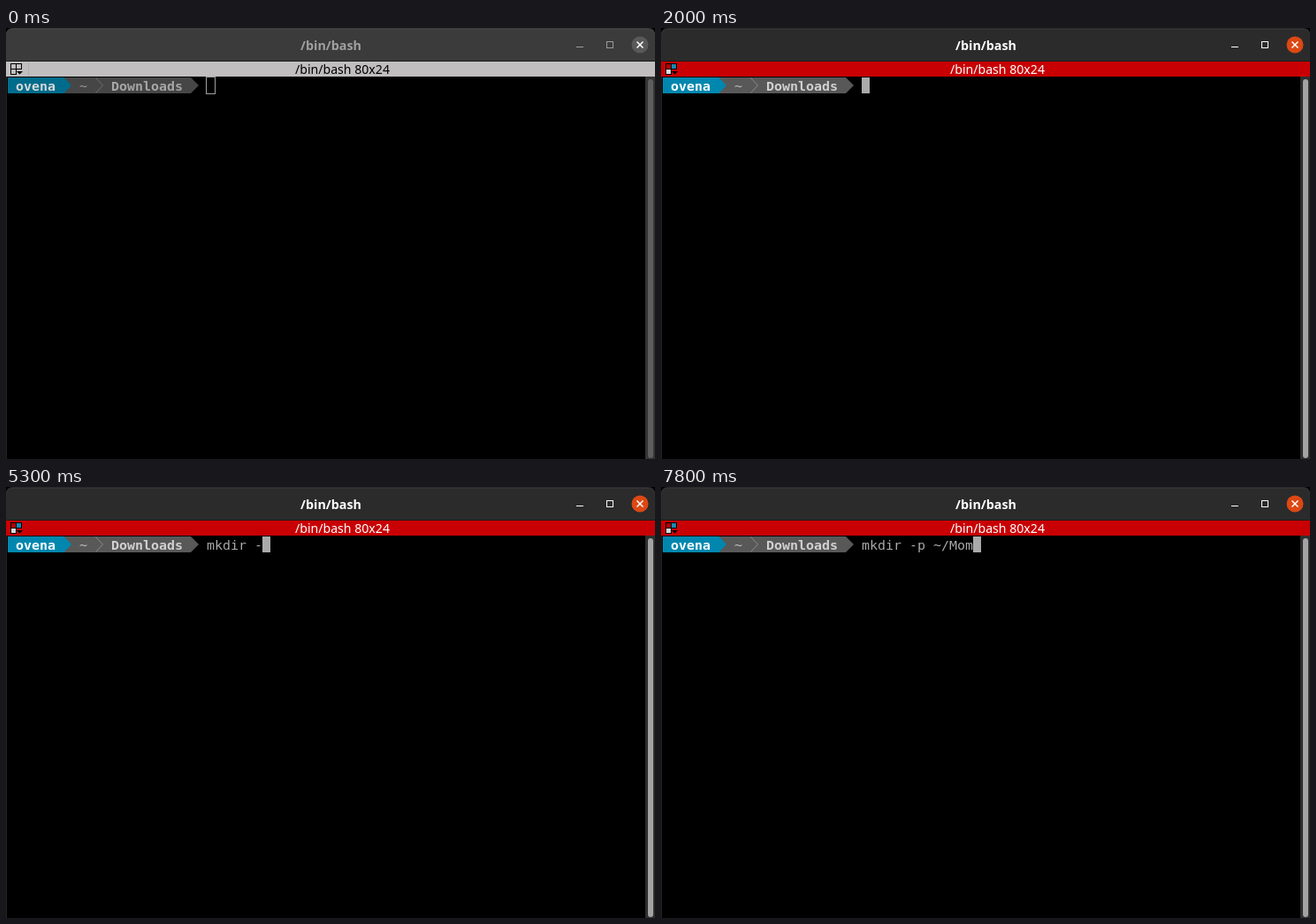
An HTML page that plays this animation: 734 by 488 pixels, repeating every 8000 ms.

```html
<!DOCTYPE html>
<html lang="en">
<head>
<meta charset="utf-8">
<title>Terminal</title>
<style>
  html, body { margin: 0; width: 100%; height: 100%; overflow: hidden; background: #000; }
  svg {
    display: block; width: 734px; height: 488px;
    --top: #434343; --head: #3b3b3b; --title: #a0a0a0; --icon: #9c9c9c; --close: #595959;
    --bar: #c0bebf; --label: #000; --rule: #b0aeaf;
    --user: #006c8c; --path: #464646; --name: #d8d8d8; --home: #969696; --dir: #a6a6a6; --sep: #6e6e6e;
    --trough: #353535; --thumb: #5e5e5e;
    --i1: #c0bebf; --i2: #c0bebf; --i3: #c0bebf;
  }
  svg.focus {
    --top: #333; --head: #2b2b2b; --title: #fff; --icon: #fff; --close: #dc4814;
    --bar: #c80003; --label: #fff; --rule: #c80003;
    --user: #0087af; --path: #585858; --name: #fff; --home: #bcbcbc; --dir: #d0d0d0; --sep: #8a8a8a;
    --trough: #2f2f2f; --thumb: #a3a3a3;
    --i1: #b00003; --i2: #1787b0; --i3: #d8d8d8;
  }
  text { white-space: pre; }
  .ui { font-family: "Noto Sans", "Open Sans", sans-serif; text-anchor: middle; }
  .mono { font: 14.95px "DejaVu Sans Mono", monospace; }
  .bold { font-weight: bold; }
</style>
</head>
<body>
<svg id="term" viewBox="0 0 734 488">
  <rect width="734" height="488" fill="#000"/>
  <rect width="1" height="488" y="38" fill="#242424"/>

  <!-- title bar -->
  <path d="M0 38V8Q0 0 8 0H726Q734 0 734 8V38Z" fill="var(--head)"/>
  <path d="M1 8Q1 1.5 8 1.5H726Q733 1.5 733 8" fill="none" stroke="var(--top)"/>
  <rect y="37" width="734" height="1" fill="#1c1c1c"/>
  <text class="ui bold" x="367.5" y="25" font-size="14.3" fill="var(--title)">/bin/bash</text>
  <rect x="645" y="21" width="8" height="1" fill="var(--icon)"/>
  <rect x="679.5" y="15.5" width="7" height="7" fill="none" stroke="var(--icon)"/>
  <circle cx="717" cy="19" r="9.5" fill="var(--close)"/>
  <path d="M713.5 15.5l7 7m0-7l-7 7" stroke="#fff" stroke-width="1.5"/>

  <!-- pane bar -->
  <rect y="38" width="734" height="17" fill="var(--bar)"/>
  <rect x="25" y="39" width="1" height="15" fill="var(--rule)"/>
  <g stroke="#000">
    <rect x="5.5" y="40.5" width="6" height="6" fill="var(--i1)"/>
    <rect x="11.5" y="40.5" width="6" height="6" fill="var(--i2)"/>
    <rect x="5.5" y="46.5" width="6" height="6" fill="var(--i3)"/>
  </g>
  <path d="M12 49h7l-3.5 3.5z" fill="#000"/>
  <text class="ui" x="380.5" y="52" font-size="14.1" fill="var(--label)">/bin/bash 80x24</text>

  <!-- scrollbar -->
  <rect x="723" y="55" width="11" height="433" fill="var(--trough)"/>
  <rect x="726" y="58" width="6" height="429" rx="3" fill="var(--thumb)"/>

  <!-- prompt -->
  <path d="M65 56H209V74H65Z" fill="var(--path)"/>
  <path d="M209 56l9 9-9 9z" fill="var(--path)"/>
  <path d="M2 56H65.500l8.500 9-8.500 9H2Z" fill="var(--user)"/>
  <path d="M101.500 56.500l8 8.500-8 8.500" fill="none" stroke="var(--sep)"/>
  <g class="mono">
    <text class="bold" x="11" y="71" fill="var(--name)">ovena</text>
    <text x="83" y="71" fill="var(--home)">~</text>
    <text class="bold" x="119" y="71" fill="var(--dir)">Downloads</text>
    <text id="line" x="227" y="71" fill="#aaa"></text>
  </g>
  <rect id="hollow" x="226.500" y="55.500" width="10" height="19" fill="none" stroke="#a0a0a0"/>
  <rect id="caret" y="56" width="9" height="18" fill="#aaa"/>

  <path id="pointer" d="M0 0V16.500L3.900 13L6.600 18.500L9.200 17.300L6.600 12H11.500Z"
        fill="#111" stroke="#fff" stroke-width="1.200"/>
</svg>
<script>
  const LOOP = 8000, FOCUS = 800, BLINK = 600, CELL = 9;

  // [time, command line after the key press]
  const keys = [
    [FOCUS, ""], [2900, "m"], [3000, "mk"], [3100, "mkd"], [3300, "mkdr"], [3400, "mkdri"],
    [4000, "mkdr"], [4100, "mkd"], [4400, "mkdir"], [5200, "mkdir "], [5300, "mkdir -"],
    [5600, "mkdir -p"], [5800, "mkdir -p "], [6000, "mkdir -p ~"], [6100, "mkdir -p ~?"],
    [6800, "mkdir -p ~"], [7000, "mkdir -p ~/"], [7500, "mkdir -p ~/M"],
    [7700, "mkdir -p ~/Mo"], [7800, "mkdir -p ~/Mom"]
  ];

  // pointer track: [time, x, y]
  const track = [[600, 50, 8], [800, 79, 43], [1000, 76, 40], [1400, 40, -20]];

  const $ = id => document.getElementById(id);
  const show = (el, on) => el.setAttribute("visibility", on ? "visible" : "hidden");
  const [term, line, caret, hollow, pointer] =
    ["term", "line", "caret", "hollow", "pointer"].map($);

  function pointerAt(t) {
    const i = track.findIndex(p => p[0] > t);
    if (i < 1) return null;
    const [t0, x0, y0] = track[i - 1], [t1, x1, y1] = track[i];
    const k = (t - t0) / (t1 - t0);
    return [x0 + (x1 - x0) * k, y0 + (y1 - y0) * k];
  }

  function draw(t) {
    const focused = t >= FOCUS;
    const [since, text] = keys.findLast(k => k[0] <= t) || [0, ""];
    term.classList.toggle("focus", focused);
    line.textContent = text;
    caret.setAttribute("x", 227 + text.length * CELL);
    show(hollow, !focused);
    show(caret, focused && Math.floor((t - since) / BLINK) % 2 === 0);

    const pos = pointerAt(Math.floor(t / 100) * 100);
    show(pointer, pos);
    if (pos) pointer.setAttribute("transform", `translate(${pos[0] + 0.5} ${pos[1] + 0.5})`);
  }

  let start;
  function tick(now) {
    start ??= now;
    draw((now - start) % LOOP);
    requestAnimationFrame(tick);
  }
  draw(0);
  requestAnimationFrame(tick);
</script>
</body>
</html>
```
